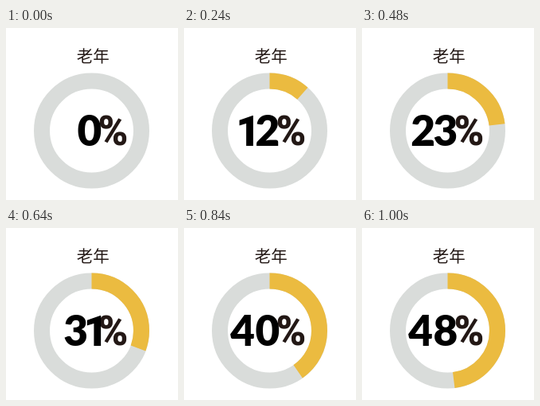
An HTML page for the animation above (4000 ms loop, 216x216 px).

```html
<!DOCTYPE html>
<html lang="zh-CN">
<head>
<meta charset="utf-8">
<title>老年</title>
<style>
  html, body { margin: 0; width: 100%; height: 100%; overflow: hidden; background: #fff; }
  svg { display: block; width: 100vw; height: 100vh; }
  circle { fill: none; stroke-width: 20; }
  .track { stroke: #d9dcda; }
  .value { stroke: #ebbb40; }
  .title { font: 300 20.5px "Noto Sans CJK SC", "Noto Sans CJK JP", sans-serif; fill: #231815; }
  .digit { font: 900 53px Lato, sans-serif; fill: #000; }
  .digit.one { font: 800 53px Roboto, sans-serif; }
  .percent { font: 900 51px Roboto, sans-serif; fill: #231815; }
</style>
</head>
<body>
<svg viewBox="0 0 216 216">
  <text class="title" x="109.3" y="43" text-anchor="middle">老年</text>
  <circle class="track" cx="107.5" cy="129" r="62.5"/>
  <circle class="value" cx="107.5" cy="129" r="62.5" pathLength="100" transform="rotate(-90 107.5 129)"/>
  <text class="percent" x="115.5" y="146.6">%</text>
  <text class="digit" id="tens" y="148.3"></text>
  <text class="digit" id="ones" y="148.3"></text>
</svg>
<script>
  const LOOP = 4000, RISE = 1000, STEP = 40, GOAL = 48;
  const TENS_SHIFT = [0, 6, 2, 2, -1];
  const arc = document.querySelector('.value');
  const tens = document.getElementById('tens');
  const ones = document.getElementById('ones');

  // The one comes from a face whose one has no foot.
  function place(node, text, x) {
    node.textContent = text;
    node.classList.toggle('one', text === 1);
    node.setAttribute('x', x);
  }

  function draw(time) {
    const elapsed = Math.floor((time % LOOP) / STEP) * STEP;
    const value = GOAL * Math.min(elapsed / RISE, 1);
    const count = Math.round(value);
    const high = Math.floor(count / 10), low = count % 10;

    arc.style.visibility = value ? 'visible' : 'hidden';
    arc.setAttribute('stroke-dasharray', `${value} 200`);

    // A one is narrower than its cell, so its neighbours close up.
    place(ones, low, 89.5 + (low === 1 ? 8 : 0));
    place(tens, high || '', 59.2 + TENS_SHIFT[high] + (low === 1 ? 11 : 0));
  }

  const start = performance.now();
  function tick() {
    draw(performance.now() - start);
    requestAnimationFrame(tick);
  }
  draw(0);
  requestAnimationFrame(tick);
</script>
</body>
</html>
```
